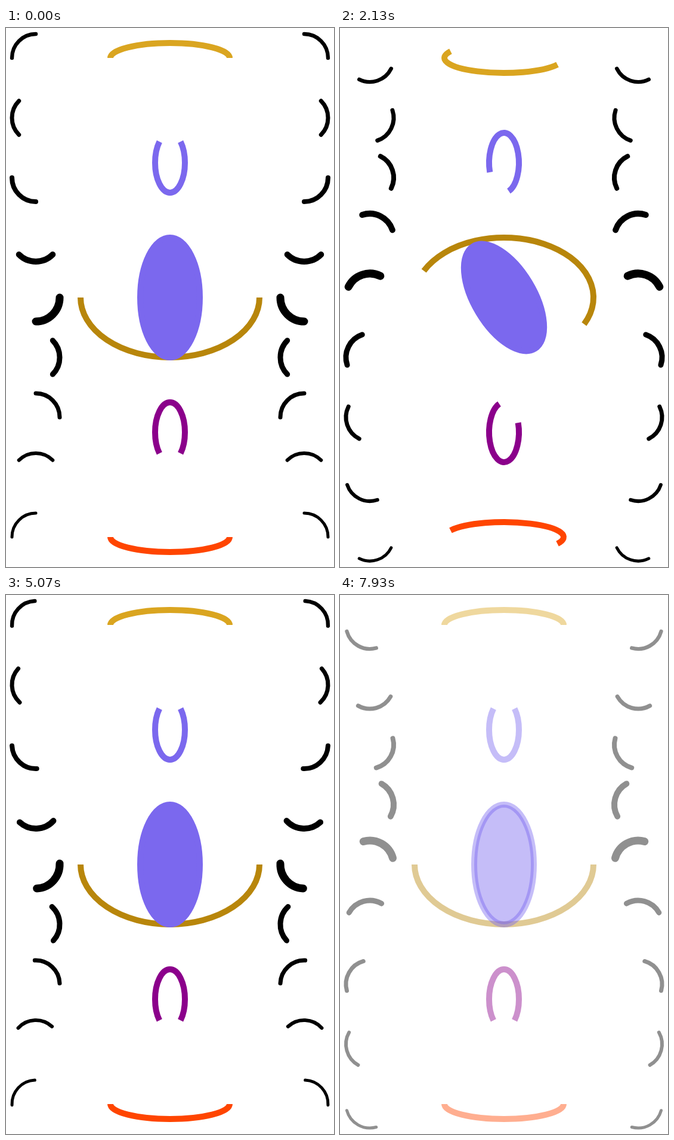
An HTML page with a canvas that plays this animation: 550 by 900 pixels, repeating every 8000 ms.

```html
<!DOCTYPE html>
<html lang="en">
<head>
<meta charset="utf-8">
<title>Spinning arcs</title>
<style>
  html, body { margin: 0; width: 100%; height: 100%; overflow: hidden; background: #fff; }
  canvas { display: block; }
</style>
</head>
<body>
<canvas id="stage" width="550" height="900"></canvas>
<script>
const ctx = document.getElementById('stage').getContext('2d');
const LOOP = 8000, FPS = 15;
const SPIN = 72;   // degrees per second
const TURN = 5;    // seconds for one full turn
const SIDE_WIDTHS = [6.4, 7, 8, 10, 13, 9, 7, 6, 5];

const rad = deg => deg * Math.PI / 180;
const clamp = (v, lo, hi) => Math.min(hi, Math.max(lo, v));

// Centre arcs: y, radii, start angle, sweep, colour
const CENTRE_ARCS = [
  [50, 100, 25, 180, 180, 'goldenrod'],
  [225, 25, 50, -45, 270, 'mediumslateblue'],
  [450, 150, 100, 0, 180, 'darkgoldenrod'],
  [675, 25, 50, 135, 270, 'darkmagenta'],
  [850, 100, 25, 0, 180, 'orangered'],
];

function strokeArc(x, y, rx, ry, start, sweep, color, width) {
  ctx.beginPath();
  ctx.ellipse(x, y, rx, ry, 0, rad(start), rad(start + sweep));
  ctx.strokeStyle = color;
  ctx.lineWidth = width;
  ctx.stroke();
}

function drawSides(angle) {
  ctx.lineCap = 'round';
  SIDE_WIDTHS.forEach((width, row) => {
    const y = 50 + 100 * row;
    const start = 180 - 45 * row - angle;
    strokeArc(50, y, 40, 40, start, 90, '#000', width);
    strokeArc(500, y, 40, 40, 90 - start, 90, '#000', width);
  });
}

function drawCentre(angle, ovalAngle) {
  ctx.lineCap = 'butt';
  for (const [y, rx, ry, start, sweep, color] of CENTRE_ARCS)
    strokeArc(275, y, rx, ry, start - angle, sweep, color, 10);

  ctx.beginPath();
  ctx.ellipse(275, 450, 50, 100, rad(ovalAngle), 0, 2 * Math.PI);
  ctx.fillStyle = ctx.strokeStyle = 'mediumslateblue';
  ctx.fill();
  ctx.stroke();
}

function draw(t) {
  const turning = clamp(t, 0, TURN);
  const slow = Math.max(0, t - TURN);
  const ovalTime = clamp(t - 1 / FPS, 0, TURN);   // the oval trails by one step

  ctx.globalAlpha = 1;
  ctx.clearRect(0, 0, 550, 900);
  ctx.globalAlpha = 1 - Math.max(0, slow - 0.1) / 5;
  drawSides(SPIN * turning + SPIN / 2 * slow);
  drawCentre(SPIN * turning, SPIN * ovalTime);
}

const origin = performance.now();
function tick() {
  const ms = (performance.now() - origin) % LOOP;
  draw(Math.floor(ms * FPS / 1000 + 0.06) / FPS);
  requestAnimationFrame(tick);
}
tick();
</script>
</body>
</html>
```
